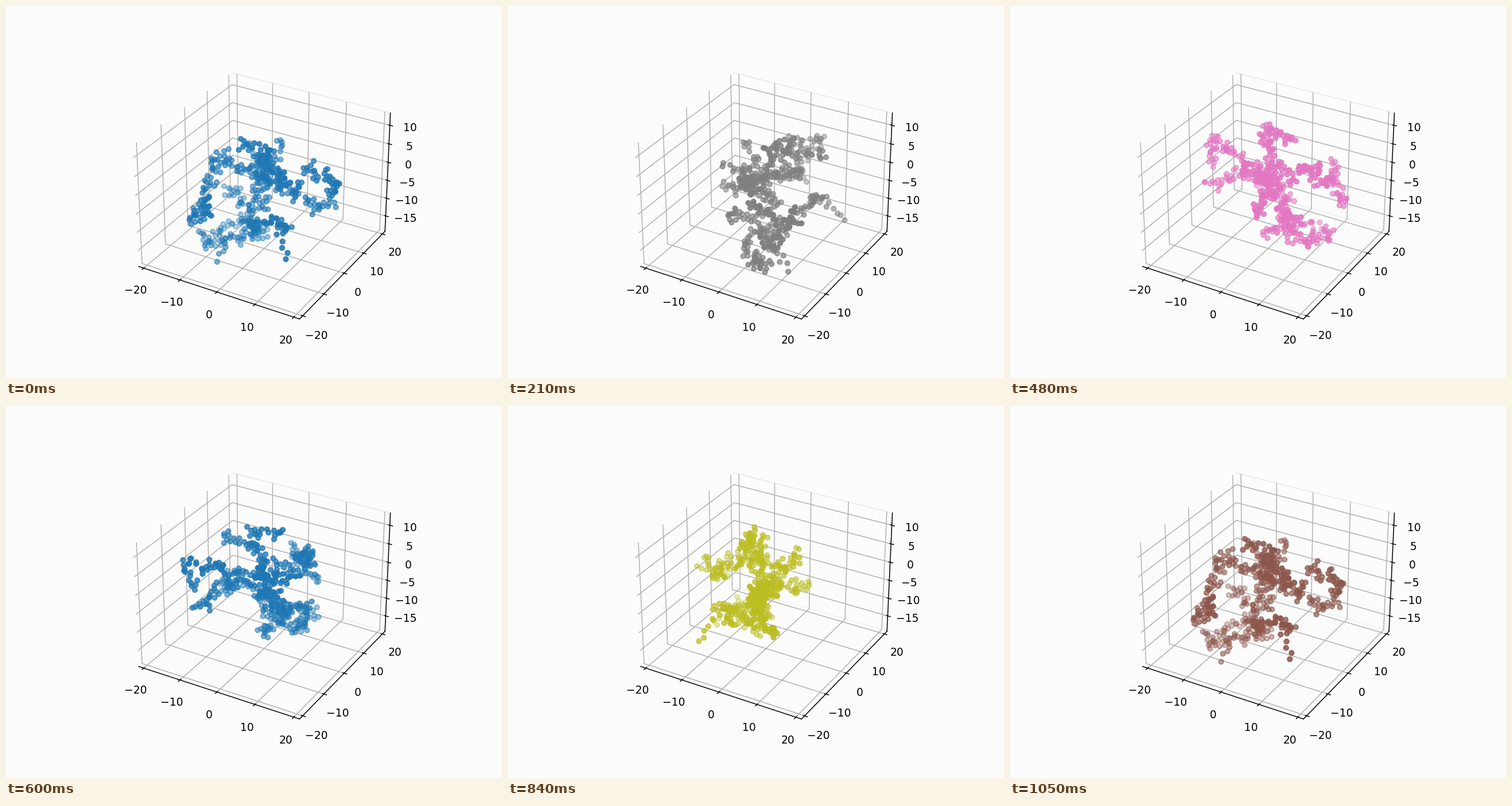
A matplotlib script that plays this animation: 864 px wide and 648 px high, repeating every 1080 ms.

```python
import matplotlib.pyplot as plt
import numpy as np
from matplotlib.animation import ArtistAnimation

FRAMES, INTERVAL = 36, 30
COUNT, GAP = 480, 1.25
REACH, CROWD = 2.8, 5
RADIUS, Z_LOW, Z_HIGH = 18.9, -17.4, 11.4
BACK = "#fcfcfc"

# name: (parent, x, y, z); the aggregate grows outward from the seed particle
BRANCHES = {
    "neck": ("seed", 0.5, -2.5, 6.5),
    "crown": ("neck", 0.3, -4.3, 11.0),
    "peak": ("crown", -5.3, -1.1, 11.2),
    "horn": ("neck", 3.5, -11.7, 6.6),
    "chest": ("seed", 7.3, -5.9, -0.1),
    "arm": ("chest", 10.7, -2.7, 5.1),
    "hand": ("arm", 16.6, -8.3, 3.5),
    "palm": ("hand", 16.0, -5.3, -0.7),
    "hip": ("chest", 12.7, -4.3, -5.9),
    "heel": ("hip", 16.3, -2.7, -4.9),
    "back": ("seed", -3.5, 9.2, 4.5),
    "fin": ("seed", 4.4, 7.2, 5.4),
    "rear": ("seed", 0.3, 8.3, -4.0),
    "trunk": ("seed", -2.9, -1.3, -8.5),
    "belly": ("trunk", -2.3, -6.3, -8.8),
    "knee": ("belly", 2.4, -12.0, -3.8),
    "shin": ("knee", 4.3, -10.0, -6.5),
    "tail": ("knee", 4.9, -17.8, -10.9),
    "side": ("trunk", -8.3, 5.7, -5.9),
    "root": ("trunk", -7.5, 2.7, -14.0),
    "sole": ("root", -9.2, -1.5, -17.0),
    "spur": ("sole", -14.2, -2.4, -13.7),
    "base": ("belly", -2.7, -2.0, -14.6),
    "stub": ("base", 0.0, 1.0, -14.0),
    "fork": ("base", -8.0, -4.3, -13.7),
    "thread": ("fork", -10.9, -8.9, -17.4),
    "wing": ("seed", -9.1, 1.6, 5.1),
    "flank": ("wing", -12.4, -1.6, -0.2),
    "elbow": ("flank", -13.4, -9.6, -3.0),
    "claw": ("elbow", -17.1, -6.1, -7.0),
    "tip": ("elbow", -12.4, -10.8, 1.3),
}
THIN = {"tail", "thread"}


def inside(p):
    return np.hypot(p[0], p[1]) < RADIUS and Z_LOW < p[2] < Z_HIGH


def distances(points, p):
    return np.linalg.norm(np.array(points) - p, axis=1)


def grow(rng):
    """Chains of particles along the branches, then particles stuck to them."""
    nodes = {"seed": np.zeros(3)}
    points, bushy = [nodes["seed"]], [0]
    for name, (parent, *end) in BRANCHES.items():
        start = nodes[parent]
        nodes[name] = end = np.array(end)
        steps = int(np.linalg.norm(end - start) / GAP)
        for k in range(1, steps + 1):
            jitter = rng.normal(0, 0.5, 3) * (k < steps)
            p = start + (end - start) * k / steps + jitter
            if distances(points, p).min() < 0.8:
                continue
            points.append(p)
            if name not in THIN:
                bushy.append(len(points) - 1)

    core = [points[i] for i in bushy]
    while len(points) < COUNT:
        step = rng.normal(size=3)
        p = points[rng.choice(bushy)] + step * GAP / np.linalg.norm(step)
        gaps = distances(points, p)
        free = gaps.min() > 1 and (gaps < 2.2).sum() <= CROWD
        if free and inside(p) and distances(core, p).min() < REACH:
            points.append(p)
            bushy.append(len(points) - 1)
    return np.array(points).T


def spin(x, y, angle):
    c, s = np.cos(angle), np.sin(angle)
    return c * x - s * y, s * x + c * y


fig = plt.figure(figsize=(6.4, 4.8), dpi=135, facecolor=BACK)
ax = fig.add_subplot(projection="3d", facecolor=BACK)

x, y, z = grow(np.random.default_rng(7))
frames = []
for i in range(FRAMES):
    angle = np.pi / 6 + 2 * np.pi * i / (FRAMES - 1)
    frames.append([ax.scatter(*spin(x, y, angle), z, color=f"C{i % 10}")])

ax.set(xlim=(-21.44, 21.44), ylim=(-21.44, 21.44), zlim=(-19.4, 13.25))
ax.set(xticks=range(-20, 21, 10), yticks=range(-20, 21, 10),
       zticks=range(-15, 11, 5))
for axis, edge in ((ax.xaxis, "none"), (ax.yaxis, "#ebebeb"), (ax.zaxis, "none")):
    axis.pane.set(alpha=None, facecolor=BACK, edgecolor=edge)

anim = ArtistAnimation(fig, frames, interval=INTERVAL, repeat=True, repeat_delay=0)
plt.show()
```
